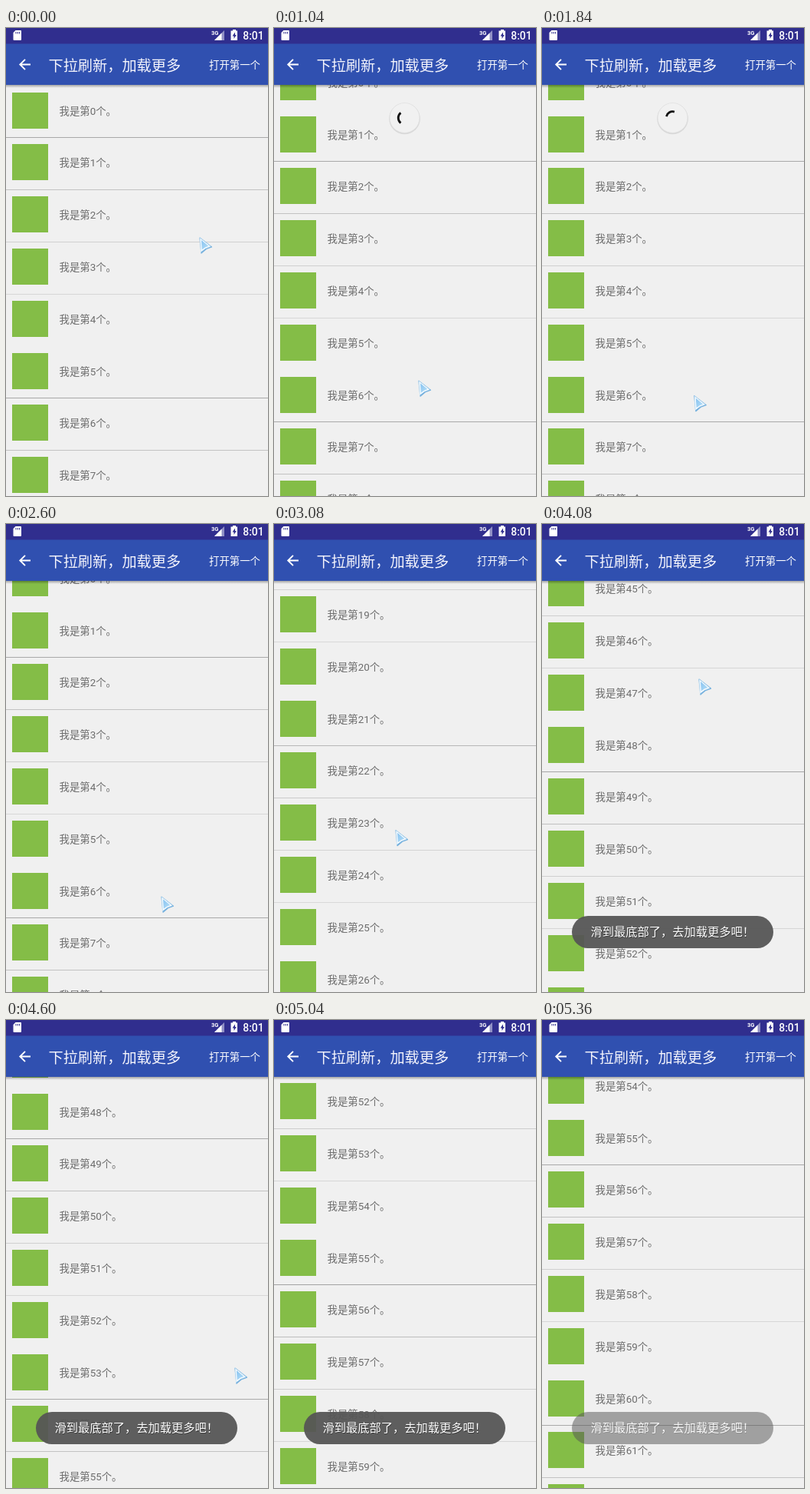
Write an HTML page that moves like this. It is 342 px wide and 609 px high and loops after 5400 ms.

```html
<!DOCTYPE html>
<html lang="zh-CN">
<head>
<meta charset="utf-8">
<style>
  html, body { margin: 0; width: 100%; height: 100%; overflow: hidden; background: #f0f0f0; }
  svg { display: block; width: 342px; height: 609px; }
  text { font-family: Roboto, "Noto Sans CJK SC", "Noto Sans CJK", sans-serif; }
  .row { font-size: 13.4px; fill: #6c6c6c; }
</style>
</head>
<body>
<svg viewBox="0 0 342 609">
  <defs>
    <clipPath id="listClip"><rect y="74" width="342" height="535"/></clipPath>
    <linearGradient id="barShadow" x2="0" y2="1">
      <stop offset="0" stop-opacity=".32"/><stop offset="1" stop-opacity="0"/>
    </linearGradient>
    <linearGradient id="pointerFill" x2="1" y2="1">
      <stop offset="0" stop-color="#86c2f0"/><stop offset="1" stop-color="#b8e0f8"/>
    </linearGradient>
  </defs>
  <rect width="342" height="609" fill="#f0f0f0"/>
  <g clip-path="url(#listClip)">
    <g id="list"></g>
    <g id="spinner">
      <circle cy="1" r="20.3" opacity=".1"/>
      <circle r="19.5" fill="#f1f1f1" stroke="#dedede" stroke-width=".7"/>
      <path id="arc" fill="none" stroke="#111" stroke-width="2.8"/>
    </g>
    <rect y="74" width="342" height="4" fill="url(#barShadow)"/>
  </g>

  <rect width="342" height="21" fill="#302e8e"/>
  <rect y="20.5" width="342" height="53.5" fill="#3050b0"/>
  <path d="M12.5 3H19q1 0 1 1v11q0 1-1 1h-8.5q-1 0-1-1V6z" fill="#fff"/>
  <path d="M13 5v2.5M15.3 5v2.5M17.6 5v2.5" stroke="#302e8e"/>
  <path d="M272 16L285 3V16z" fill="#8f8fc4"/>
  <path d="M272 16L281.5 6.5V16z" fill="#fff"/>
  <text x="268" y="9" font-size="7.5" font-weight="700" fill="#fff">3G</text>
  <path d="M296 2h4v1.5h2V16h-8.5V3.5H296z" fill="#fff"/>
  <path d="M299 5.5l-3.5 5h2v3.5l3.3-5h-1.8z" fill="#302e8e"/>
  <text x="309.3" y="14.7" font-size="13.8" font-weight="500" fill="#fff">8:01</text>
  <path d="M32 47.5H18.5M25 40.8L18.3 47.5L25 54.2" fill="none" stroke="#fff" stroke-width="1.9"/>
  <text x="55.5" y="55.7" font-size="19.2" fill="#f4f4fc">下拉刷新，加载更多</text>
  <text x="265" y="52.8" font-size="13.4" fill="#fff">打开第一个</text>

  <g id="toast" font-size="15.25">
    <rect x="39" y="510" width="263" height="42" rx="21" fill="#555" fill-opacity=".94"/>
    <text x="64" y="537.3" fill="#222" opacity=".6">滑到最底部了，去加载更多吧！</text>
    <text x="63.5" y="536.3" fill="#fff">滑到最底部了，去加载更多吧！</text>
  </g>
  <g id="pointer" stroke-linejoin="round">
    <path d="M1 1L16.500 13L9.500 15.500L3 21z" fill="#5f9fd4" stroke="#78b2de" stroke-width="1.200"/>
    <path d="M1.500 1.500L15 12.300L8.500 14.800L2.500 19.300z" fill="#fff" stroke="#d4ebfa" stroke-width=".8"/>
    <path d="M3 4L12.500 11.800L8 13.500L3.800 16.500z" fill="url(#pointerFill)"/>
  </g>
</svg>
<script>
const LOOP = 5400, STEP = 40, PITCH = 67.8, LIST_TOP = 75.1, TAU = 2 * Math.PI;
const $ = id => document.getElementById(id);

// Progress from 0 to 1 between two times.
const ramp = (t, from, to) => Math.min(1, Math.max(0, (t - from) / (to - from)));
const fling = (t, from, to, power) => 1 - (1 - ramp(t, from, to)) ** power;

// The opening drag goes up and returns, pulls past the top, then pushes back a little.
const lift = t => 150 * Math.sin(Math.PI * ramp(t, 0, 560));
const push = t => 36.8 * ramp(t, 800, 960);

const scrollAt = t => lift(t) + push(t)
  + 2818.2 * fling(t, 2760, 3840, 1.652)
  + 387.4 * fling(t, 3920, 4600, 3.114)
  + 440.6 * fling(t, 4600, 5360, 1.2);

const swipes = t => 207 * (Math.cos(TAU * 2.865 * ramp(t, 2760, 3840)) - 1);

const pointerX = t => 252 - 64 * ramp(t, 0, 960)
  + 23 * ramp(t, 1500, 2300) - 9 * ramp(t, 2300, 2600)
  - 44 * Math.sin(Math.PI * ramp(t, 2760, 3400))
  + 2 * ramp(t, 3920, 4080) + 146 * ramp(t, 4080, 4888);

const pointerY = t => 272 - lift(t) + 223 * ramp(t, 560, 800) - push(t)
  + 30 * ramp(t, 1100, 2240) - 4 * ramp(t, 2300, 2600)
  + swipes(t) - 213 * ramp(t, 3920, 4080) + 251 * ramp(t, 4080, 4600);

function set(el, attrs) {
  for (const name in attrs) el.setAttribute(name, attrs[name]);
}

function add(parent, tag, attrs) {
  const el = document.createElementNS("http://www.w3.org/2000/svg", tag);
  set(el, attrs);
  return parent.appendChild(el);
}

const rows = Array.from({ length: 10 }, () => {
  const group = add($("list"), "g", {});
  const line = add(group, "rect", { width: 342, height: 1 });
  add(group, "rect", { x: 8, y: 9, width: 47, height: 47, fill: "#84bd47" });
  const label = add(group, "text", { x: 69.5, y: 38.3, class: "row" });
  return { group, line, label };
});

function drawList(scroll) {
  const first = Math.max(0, Math.floor((scroll - 2) / PITCH));
  rows.forEach((row, i) => {
    const index = first + i;
    const y = LIST_TOP + index * PITCH - scroll;
    const top = Math.floor(y), part = y - top;
    set(row.group, { transform: `translate(0 ${top})` });
    // Thin dividers vary in strength with their subpixel position.
    set(row.line, { opacity: index === 0 || part < .2 ? 0 : .1 + .27 * part ** 3 });
    row.label.textContent = `我是第${index}个。`;
  });
}

function drawSpinner(t) {
  const y = 50 + 90 * ramp(t, 560, 760) - 23 * ramp(t, 800, 920);
  const scale = 1 - ramp(t, 2240, 2400);
  const middle = 180 + (t - 1040) * .525;
  const length = 130 + 100 * Math.sin((t - 1040) / 1333 * TAU - .25);
  const point = deg => {
    const a = deg / 360 * TAU;
    return `${8.3 * Math.cos(a)} ${8.3 * Math.sin(a)}`;
  };
  const large = length > 180 ? 1 : 0;
  set($("arc"), {
    d: `M${point(middle - length / 2)}A8.3 8.3 0 ${large} 1 ${point(middle + length / 2)}`
  });
  set($("spinner"), {
    transform: `translate(170.5 ${y}) scale(${scale})`,
    visibility: scale > 0 ? "visible" : "hidden"
  });
}

function render(time) {
  let t = Math.floor((time % LOOP) / STEP) * STEP;
  // The picture rests briefly before the long fling and at the list's end.
  if (t > 2600 && t < 2800) t = 2600;
  if (t > 3840 && t < 3960) t = 3840;
  drawList(scrollAt(t));
  drawSpinner(t);
  set($("toast"), { opacity: ramp(t, 3920, 4080) - .45 * ramp(t, 5240, 5360) });
  set($("pointer"), { transform: `translate(${pointerX(t)} ${pointerY(t)})` });
}

const start = performance.now();
function tick() {
  render(performance.now() - start);
  requestAnimationFrame(tick);
}
tick();
</script>
</body>
</html>
```
